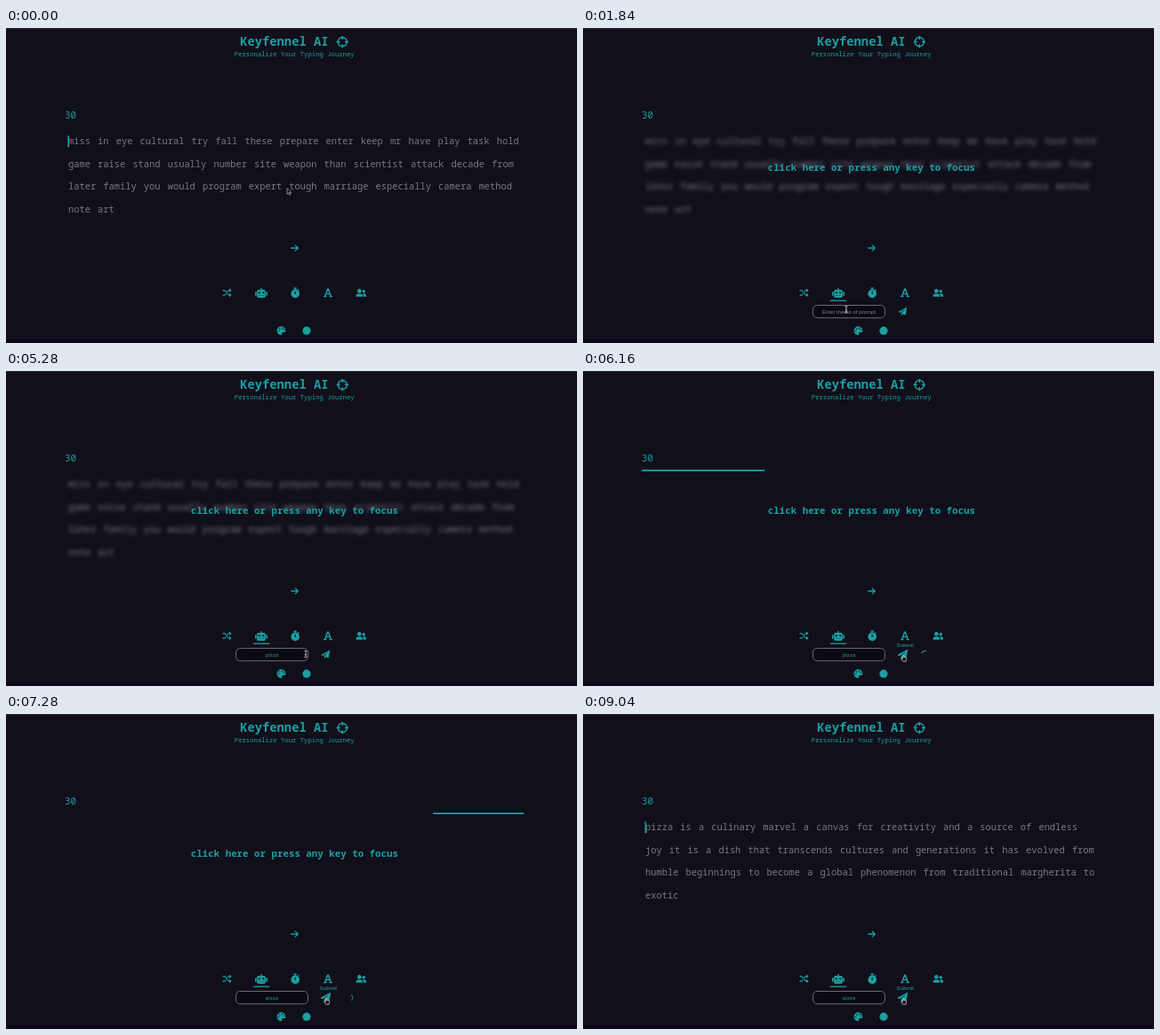
Write an HTML page that moves like this. It is 642 px wide and 355 px high and loops after 9080 ms.

```html
<!DOCTYPE html>
<html lang="en">
<head>
<meta charset="utf-8">
<title>Typing practice</title>
<style>
html, body { margin: 0; width: 100%; height: 100%; overflow: hidden; background: #110f1a; }
svg { display: block; width: 100vw; height: 100vh; }
text { font-family: "Noto Sans Mono", "DejaVu Sans Mono", monospace; white-space: pre; }
.b { font-weight: 700; }
.ui { font-family: "Liberation Sans", Arial, sans-serif; text-anchor: middle; }
.words { font-size: 10.4px; word-spacing: 1.9px; fill: #7b7887; }
.line { fill: none; stroke: #1b9fa1; }
.hole { fill: #110f1a; }
</style>
</head>
<body>
<svg viewBox="0 0 642 355" fill="#1b9fa1">
  <defs><filter id="soft" x="-5%" y="-10%" width="110%" height="120%"><feGaussianBlur stdDeviation="2.2"/></filter></defs>
  <rect width="642" height="355" fill="#110f1a"/>
  <rect width="642" height="1" fill="#2b2a31"/>
  <rect y="351" width="642" height="4" fill="#0e0717"/>

  <text class="b" x="263.2" y="20" font-size="13.8">Keyfennel AI</text>
  <g class="line" transform="translate(378.3 15.6)" stroke-width="1.5">
    <circle r="5.1"/>
    <path d="M0-6.7V-2.6M0 6.7V2.6M-6.7 0H-2.6M6.7 0H2.6"/>
  </g>
  <text x="256.8" y="32" font-size="7.26">Personalize Your Typing Journey</text>
  <text x="66" y="101.8" font-size="10.8">30</text>

  <g id="words" class="words"></g>
  <rect id="caret" x="69.4" y="121.3" width="1.7" height="13"/>
  <text id="focus" class="b" x="207.8" y="161" font-size="10.8">click here or press any key to focus</text>
  <rect id="bar" y="111.2" height="1.8"/>

  <path class="line" d="M320.2 248H328M324.9 244.6L328.3 248L324.9 251.4" stroke-width="1.3"/>

  <g transform="translate(248.5 298.4)">
    <path class="line" d="M-5-2.7H-3.2C-.6-2.7 .2 2.7 2.6 2.7H3.4M-5 2.7H-3.2Q-2 2.7-1.3 1.4M.5-1.3Q1.3-2.7 2.6-2.7H3.4" stroke-width="1.3"/>
    <path d="M2.6-5L5.2-2.7L2.6-.4ZM2.6 5L5.2 2.7L2.6 .4Z"/>
  </g>
  <g id="robot">
    <path d="M-.7-5.7H.7V-3.6H3A1.8 1.8 0 0 1 4.8-1.8V3.7A1.6 1.6 0 0 1 3.2 5.3H-3.2A1.6 1.6 0 0 1-4.8 3.7V-1.8A1.8 1.8 0 0 1-3-3.6H-.7Z"/>
    <path d="M-7-.9Q-7-1.4-6.5-1.4H-5.4V3.2H-6.5Q-7 3.2-7 2.7ZM7-.9Q7-1.4 6.5-1.4H5.4V3.2H6.5Q7 3.2 7 2.7Z"/>
    <g class="hole">
      <circle cx="-2.2" cy="-.3" r="1.1"/><circle cx="2.2" cy="-.3" r="1.1"/>
      <path d="M-2.9 2.8H-1.5V3.5H-2.9ZM-.7 2.8H.7V3.5H-.7ZM1.5 2.8H2.9V3.5H1.5Z"/>
    </g>
  </g>
  <g transform="translate(325.2 298.4)">
    <path d="M-1.8-5.9H1.8V-4.6H.7V-3.6H-.7V-4.6H-1.8Z"/>
    <path class="line" d="M3-2.7L4.2-3.9" stroke-width="1.3"/>
    <circle cy="1" r="4.8"/>
    <path class="hole" d="M-.6-1.7H.6V1.6H-.6Z"/>
  </g>
  <path transform="translate(362 298.4)" fill-rule="evenodd" d="M-.9-4.8H.9L4 3.5H5V4.8H1.5V3.5H2.4L1.8 1.8H-1.8L-2.4 3.5H-1.5V4.8H-5V3.5H-4ZM0-3L-1.3 .5H1.3Z"/>
  <g transform="translate(399.3 298.4)">
    <circle cx="-2" cy="-2" r="2.3"/><circle cx="2.9" cy="-1.7" r="1.8"/>
    <path d="M-5.7 4.3V3.2Q-5.7 1-3.4 1H-.6Q1.7 1 1.7 3.2V4.3ZM2.5 4.3V3.2Q2.5 1.8 1.6 .9H3.4Q5.7 .9 5.7 3V4.3Z"/>
  </g>
  <g transform="translate(309.5 341.2)">
    <path d="M0-4.9A4.9 4.9 0 1 0 0 4.9C1.4 4.9 .6 3.5 .6 2.8Q.6 1.7 1.8 1.7H3.4Q4.9 1.7 4.9 0A4.9 4.9 0 0 0 0-4.9Z"/>
    <g class="hole"><circle cx="-3" cy=".3" r=".75"/><circle cx="-1.8" cy="-2.3" r=".75"/><circle cx="1" cy="-3" r=".75"/><circle cx="3" cy="-1.2" r=".75"/></g>
  </g>
  <circle cx="338" cy="341.2" r="4.6"/>

  <g id="panel">
    <rect x="277.8" y="306.6" width="18.4" height="1.3"/>
    <rect x="258.6" y="312.5" width="80.8" height="14.2" rx="4.6" fill="#0b0a12" stroke="#77757e" stroke-width=".9"/>
    <text id="field" class="ui" x="299" y="321.8" font-size="6.03"></text>
    <g id="plane"><path d="M5.1-5L3.5 4L.4 2.7L-1.4 4.8V1.9L3.2-3L-2.5 1.4L-5 .4Z"/></g>
  </g>
  <path id="spin" class="line" d="M-3.1-3.1A4.4 4.4 0 0 1 3.1-3.1" stroke-width="1"/>
  <text id="tipAI" class="ui" x="287" y="283.5" font-size="6.25">AI</text>
  <text id="tipSend" class="ui" x="362.3" y="311" font-size="6.25">Submit</text>

  <g id="mouse" stroke-linejoin="round">
    <path id="arrow" d="M0 0V6.7L1.6 5.3L2.7 7.7L3.8 7.2L2.8 4.9H4.8Z" fill="#08070c" stroke="#d8d8dc" stroke-width=".6"/>
    <path id="hand" d="M-.5-2.9Q.3-3.5.8-2.7V-.2L3-.1Q3.8.2 3.7 1.3L3 4.2H-.3L-2.2 1.4Q-2.2.3-1.2.8L-.5 1.3Z" fill="#08070c" stroke="#e2e2e6" stroke-width=".7"/>
    <path id="beam" d="M-1.6-3.8Q0-3.8 0-2.8Q0-3.8 1.6-3.8M0-2.8V2.8M-1.6 3.8Q0 3.8 0 2.8Q0 3.8 1.6 3.8M-1 .9H1" fill="none" stroke="#c9c9ce" stroke-width=".9"/>
  </g>
</svg>
<script>
const LOOP = 9080, CLICK = 880, SEND = 5860, DONE = 7560, HALF = 840;
const BAR_LEFT = 66, BAR_WIDTH = 516.4;

const before = [
  'miss in eye cultural try fall these prepare enter keep mr have play task hold',
  'game raise stand usually number site weapon than scientist attack decade from',
  'later family you would program expert tough marriage especially camera method',
  'note art'
];
const after = [
  'pizza is a culinary marvel a canvas for creativity and a source of endless',
  'joy it is a dish that transcends cultures and generations it has evolved from',
  'humble beginnings to become a global phenomenon from traditional margherita to',
  'exotic'
];
const keys = [3520, 3720, 4000, 4160, 4320];

// time, x, y
const path = [
  [40, 316, 180.5], [660, 288.5, 300], [920, 288.5, 300], [1360, 296, 317.3],
  [4920, 296, 317.3], [5280, 337, 319], [5560, 360, 323]
];

const $ = id => document.getElementById(id);
const clamp = (v, a = 0, b = 1) => Math.min(b, Math.max(a, v));
const smooth = u => u * u * (3 - 2 * u);
const set = (id, attrs) => { for (const k in attrs) $(id).setAttribute(k, attrs[k]); };
const show = (id, on) => set(id, { visibility: on ? 'visible' : 'hidden' });

// CSS-style cubic-bezier timing
function bezier(x1, y1, x2, y2) {
  const at = (a, b, s) => 3 * a * s * (1 - s) ** 2 + 3 * b * s * s * (1 - s) + s ** 3;
  return x => {
    let lo = 0, hi = 1;
    for (let i = 0; i < 24; i++) {
      const mid = (lo + hi) / 2;
      if (at(x1, x2, mid) < x) lo = mid; else hi = mid;
    }
    return at(y1, y2, lo);
  };
}
const ease = bezier(.25, .1, .25, 1);
const easeInOut = bezier(.42, 0, .58, 1);

let shown;
function setWords(lines) {
  if (shown === lines) return;
  shown = lines;
  $('words').innerHTML = lines.map((s, i) =>
    `<text x="70" y="${131.4 + i * 25.4}">${s}</text>`).join('');
}

function mouseAt(t) {
  if (t <= path[0][0]) return path[0].slice(1);
  for (let i = 1; i < path.length; i++) {
    const [t0, x0, y0] = path[i - 1], [t1, x1, y1] = path[i];
    if (t < t1) {
      const u = smooth((t - t0) / (t1 - t0));
      return [x0 + (x1 - x0) * u, y0 + (y1 - y0) * u];
    }
  }
  return path[path.length - 1].slice(1);
}

function caretAlpha(t) {
  if (t < CLICK) return 1;
  if (t < DONE) return 0;
  if (t < 7660) return 1;
  return t < 8580 ? 1 - ease((t - 7660) / 920) : ease(clamp((t - 8580) / 800));
}

function draw(t) {
  const blurred = t >= CLICK && t < SEND;
  const loading = t >= SEND && t < DONE;
  const open = t >= CLICK;

  setWords(t < DONE ? before : after);
  show('words', !loading);
  if (blurred) set('words', { filter: 'url(#soft)' }); else $('words').removeAttribute('filter');
  set('caret', { opacity: caretAlpha(t) });
  show('focus', open && t < DONE);
  show('panel', open);

  const typed = 'pizza'.slice(0, keys.filter(k => t >= k).length);
  $('field').textContent = typed || 'Enter theme of prompt';
  set('field', { fill: typed ? '#1b9fa1' : '#85838b' });

  const [x, y] = mouseAt(t);
  const overAI = t > 560 && t < 1060, overSend = t >= 5460;
  const grow = .22 * (smooth(clamp((t - 560) / 150)) - smooth(clamp((t - 1060) / 150)));
  const lift = .2 * smooth(clamp((t - 5460) / 150));
  set('robot', { transform: `translate(287 298.6) scale(${1 + grow})` });
  set('plane', { transform: `translate(359.2 319.5) scale(${1 + lift})` });
  show('tipAI', overAI);
  show('tipSend', overSend);

  const beam = t >= 1160 && t < 5340 && !(t >= keys[0] && t < 4920);
  set('mouse', { transform: `translate(${x} ${y})` });
  show('arrow', t <= 560 || (t >= 1060 && t < 1160) || (t >= 5340 && t < 5460));
  show('hand', overAI || overSend);
  show('beam', beam);

  show('bar', loading);
  show('spin', loading);
  if (loading) {
    const u = ((t - SEND) / HALF) % 2;
    const from = u > 1 ? easeInOut(u - 1) : 0, to = u < 1 ? easeInOut(u) : 1;
    set('bar', { x: BAR_LEFT + BAR_WIDTH * from, width: BAR_WIDTH * (to - from) });
    set('spin', { transform: `translate(385.2 319.6) rotate(${(t - 6680) / 480 * 360})` });
  }
}

const start = performance.now();
function tick() {
  draw((performance.now() - start) % LOOP);
  requestAnimationFrame(tick);
}
draw(0);
requestAnimationFrame(tick);
</script>
</body>
</html>
```
